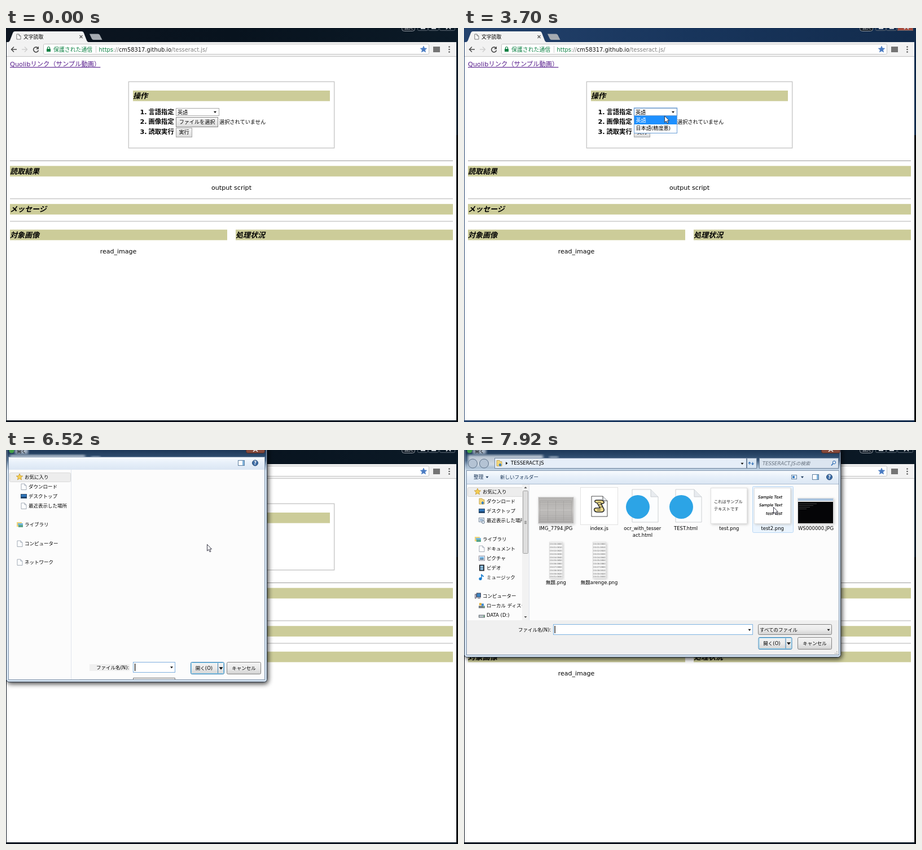
Recreate the animation shown at these times as an HTML page. Size 801 by 699 pixels, loop 7.99 s.

```html
<!DOCTYPE html>
<html lang="ja">
<meta charset="utf-8">
<title>文字読取</title>
<style>
  html, body { margin: 0; width: 100%; height: 100%; overflow: hidden; background: #fff; }
  svg { display: block; font-family: "DejaVu Sans", "Noto Sans CJK JP", sans-serif; }
</style>
<svg id="stage" width="801" height="699" viewBox="0 0 801 699"></svg>
<script>
const LOOP = 7990;

// Drawing helpers; text is placed by its vertical centre.
const rect = (x, y, w, h, fill, more = '') =>
  `<rect x="${x}" y="${y}" width="${w}" height="${h}" fill="${fill}" ${more}/>`;
const box = (x, y, w, h, fill, stroke, r = 0) =>
  rect(x + .5, y + .5, w - 1, h - 1, fill, `stroke="${stroke}" rx="${r}"`);
const text = (s, x, y, size = 8.5, more = '') =>
  `<text x="${x}" y="${y + size * .37}" font-size="${size}" ${more}>${s}</text>`;
const mid = (s, x, y, size, more = '') => text(s, x, y, size, 'text-anchor="middle" ' + more);
const path = (d, fill, stroke = 'none', width = 1) =>
  `<path d="${d}" fill="${fill}" stroke="${stroke}" stroke-width="${width}"/>`;
const circle = (x, y, r, fill, stroke = 'none') =>
  `<circle cx="${x}" cy="${y}" r="${r}" fill="${fill}" stroke="${stroke}"/>`;
const tri = (x, y, s = 2.5, fill = '#111') => path(`M${x - s} ${y - s / 2}h${2 * s}l${-s} ${s * 1.3}z`, fill);
const group = (id, ...parts) => `<g id="${id}">${parts.join('')}</g>`;
const grad = (id, across, ...stops) =>
  `<linearGradient id="${id}" x2="${across}" y2="${1 - across}">` +
  stops.map((c, i) => `<stop offset="${i / (stops.length - 1)}" stop-color="${c}"/>`).join('') +
  '</linearGradient>';
const sheet = (x, y, w, h, fold, stroke = '#8d98a5') =>
  path(`M${x} ${y}h${w - fold}l${fold} ${fold}v${h - fold}h${-w}z`, '#fcfdfe', stroke, .8) +
  path(`M${x + w - fold} ${y}v${fold}h${fold}`, '#e8ebef', stroke, .8);
const star = (x, y, r, fill, stroke) => path('M' + Array.from({ length: 10 }, (_, i) => {
  const a = i * Math.PI / 5, q = i % 2 ? r * .45 : r;
  return `${(x + q * Math.sin(a)).toFixed(2)} ${(y - q * Math.cos(a)).toFixed(2)}`;
}).join('L') + 'z', fill, stroke, .7);

const defs = '<defs>' +
  grad('dark', 1, '#0d1520', '#08131e', '#0b1a27') +
  grad('blue', 1, '#24426c', '#18355c', '#122b4c') +
  grad('button', 0, '#f7f7f7', '#dcdcdc') +
  grad('pressed', 0, '#d4d4d4', '#eeeeee') +
  grad('winButton', 0, '#f3f3f3', '#ebebeb', '#d2d2d2') +
  grad('tools', 0, '#f8fbfe', '#e6eff9', '#dbe6f3') +
  grad('header', 0, '#1d3858', '#2a4768', '#3f5d7f', '#91a9c2', '#cfdfee') +
  grad('photo', 0, '#b3b1af', '#c6c4c2', '#adabaa') +
  '<filter id="soft"><feGaussianBlur stdDeviation="2"/></filter>' +
  '<filter id="shadow" x="-10%" y="-10%" width="120%" height="120%">' +
  '<feDropShadow dx="2" dy="3" stdDeviation="4" flood-opacity=".75"/></filter></defs>';

function browser() {
  const green = 'fill="#0b8043"', white = '#c9ced4';
  const glyphs = rect(735, 0, 8, 2, white) + rect(754, 0, 8, 2, white) +
    path('M780 2l3-3M788 2l-3-3', 'none', white, 2);
  return rect(0, 0, 801, 699, 'url(#dark)') +
    group('active', rect(0, 0, 801, 699, 'url(#blue)'), rect(768, 0, 28, 5, '#a64a3c')) +
    rect(798, 190, 3, 509, '#05090f') +
    box(701, -8, 24, 14, '#18222d', '#8c949d', 4) + text('拡大', 706, -1, 7.5, `fill="${white}"`) +
    [[729, 19], [748, 19], [768, 28]].map(([x, w]) => box(x, -8, w, 13, 'none', '#5d6874', 2)).join('') + glyphs +
    rect(1, 25, 797, 671, '#fff') + rect(1, 25, 797, 25, '#f2f2f2') + rect(1, 50, 797, 1, '#c4c4c4') +
    path('M3 25.5Q6 25 7 22L12 9Q13 6 16 6H134Q137 6 138 9L143 22Q144 25 148 25.5z', '#f2f2f2') +
    path('M148 10.5H163Q165 10.5 166 12L170.500 21H155Q153 21 152 19z', '#a6abb1') +
    sheet(19, 11, 7, 9, 3, '#555') + text('文字読取', 31, 15.5, 8.8) +
    path('M130.500 13l5 5m0-5l-5 5', 'none', '#555', 1.2) +
    path('M19 38H9.500M14 33.500L9.500 38L14 42.500', 'none', '#4a4a4a', 1.5) +
    path('M28 38H37.500M33 33.500L37.500 38L33 42.500', 'none', '#cfcfcf', 1.5) +
    path('M57 36A4.500 4.500 0 1 0 57.500 39.500', 'none', '#4a4a4a', 1.6) + path('M58 32.500v5h-5z', '#4a4a4a') +
    box(66, 28, 684, 19, '#fff', '#c3c3c3', 2) +
    rect(72, 37, 7, 5, '#0b8043') + path('M73.500 37v-1.500a2 2 0 0 1 4 0V37', 'none', '#0b8043', 1.2) +
    text('保護された通信', 84, 38, 9.9, green) + rect(159, 32, 1, 12, '#ccc') +
    text('<tspan fill="#0b8043">https</tspan>://<tspan fill="#111">cm58317.github.io</tspan>/tesseract.js/',
      164.5, 38, 9.9, 'fill="#808080"') +
    star(740, 38, 6, '#4a7bc2', '#4a7bc2') + rect(757, 33, 12, 10, '#747474') +
    [33.5, 38, 42.5].map(y => circle(785.5, y, 1.3, '#555')).join('');
}

function page() {
  const heading = (s, x, y, w) => rect(x, y, w, 18.7, '#cccc99') +
    text(s, x, y + 9, 13, 'font-weight="bold" font-style="italic"');
  const line = y => rect(7, y, 785, 1, '#a3a3a3') + rect(7, y + 1, 785, .5, '#e8e8e8');
  const step = (n, s, y) => text(n + '.', 237.5, y, 11.3, 'font-weight="bold"') +
    text(s, 252.5, y, 11.3, 'font-weight="bold"');
  return text('Quolibリンク（サンプル動画）', 7, 64, 11.3, 'fill="#551a8b" text-decoration="underline"') +
    rect(217.3, 95.3, 364.4, 117.6, '#fff', 'stroke="#cacaca" stroke-width="1.5"') +
    heading('操作', 225, 111, 349) +
    step(1, '言語指定', 149) + step(2, '画像指定', 166) + step(3, '読取実行', 184) +
    box(301, 142, 77, 14, '#fff', '#a9a9a9') + group('hover', box(301, 142, 77, 14, 'none', '#7c7c7c')) +
    group('focus', rect(301.5, 142, 76, 13.5, 'none', 'stroke="#6b9fd8" stroke-width="1.4"')) +
    text('英語', 304, 149.3, 9.1) + tri(370.5, 149, 2.5) +
    box(301, 158, 75, 18, 'url(#button)', '#a4a4a4') +
    group('pressed', box(301, 158, 75, 18, 'url(#pressed)', '#8a8a8a')) +
    group('ring', box(301, 158, 75, 18, 'none', '#6b9fd8')) +
    mid('ファイルを選択', 338.5, 166.7, 9.1) + text('選択されていません', 378, 166.7, 9.2) +
    box(301, 177, 29, 17, 'url(#button)', '#a4a4a4') + mid('実行', 315.5, 185, 9.1) +
    line(235) + heading('読取結果', 7, 244.7, 785) + mid('output script', 399.5, 282.5, 11.1) +
    line(302.5) + heading('メッセージ', 7, 312.2, 785) + line(342.5) +
    heading('対象画像', 7, 357.7, 385) + heading('処理状況', 407, 357.7, 385) +
    mid('read_image', 199, 395.5, 11) +
    group('menu', box(301, 155, 77, 32, '#fff', '#6b9fd8'), rect(302, 156, 75, 15, '#1e90ff'),
      text('英語', 304.5, 163.3, 9.1, 'fill="#fff"'), text('日本語(精度悪)', 304.5, 178, 9.1)) +
    group('tip', box(356, 181, 87, 18, '#fff', '#8a8a8a', 1),
      text('選択されていません', 358.5, 190, 9, 'fill="#555"'));
}

const caretLine = (x, y) => rect(x, y, 1.2, 13, '#000', 'class="caret"');
const winButton = (s, x, y, w) => box(x, y, w, 22, 'url(#winButton)', '#838383', 2) + mid(s, x + w / 2, y + 11);
const openButton = (x, y) => box(x, y, 60, 22, 'url(#winButton)', '#3c7fb1', 2) +
  box(x + 1, y + 1, 58, 20, 'none', '#8fd3f1', 1) + rect(x + 48, y + 2, 1, 18, '#3c7fb1') +
  mid('開く(O)', x + 24, y + 11) + tri(x + 54, y + 11, 3.5);
const toolIcons = (x, y) => box(x, y - 5, 12, 10, '#fff', '#6080a0') + rect(x + 8, y - 4, 3, 8, '#7fb2dc') +
  circle(x + 30.5, y, 5, '#3e6ea8', '#24476f') + mid('?', x + 30.5, y, 8, 'fill="#fff" font-weight="bold"');

// Glass frame: the browser's dark caption and pale tab show through, blurred.
function frame(w, h, closeX) {
  return rect(.5, -10, w - 1, h + 9.5, '#cfdfee', 'stroke="#26364a" rx="5" filter="url(#shadow)"') +
    rect(1, 0, w - 2, 37, 'url(#header)') +
    rect(7, 9, 133, 20, '#eef3f8', 'opacity=".75" filter="url(#soft)"') +
    rect(151, 11, 16, 9, '#b9c6d4', 'opacity=".7" filter="url(#soft)"') +
    rect(16, -3, 23, 10, '#e6eef7', 'opacity=".7" filter="url(#soft)"') +
    rect(1.5, -8, w - 3, h + 6.5, 'none', 'stroke="#f2f8fd" stroke-opacity=".55" rx="4"') +
    circle(10, 1, 4.5, '#43a047') + text('開く', 19, 2) +
    box(closeX, -8, 34, 14, '#85493b', '#4b2a25', 3) +
    path(`M${closeX + 13} 3l4-4l4 4`, 'none', '#eee', 1.6);
}

// Navigation icons, drawn around their centre.
const icons = {
  star: (x, y) => star(x, y, 6, '#f6cf52', '#b98a1d'),
  doc: (x, y) => sheet(x - 4, y - 5, 9, 10.5, 3),
  desk: (x, y) => box(x - 5, y - 4, 11, 8, '#2f74b8', '#33506e') + rect(x - 4, y + 1, 9, 2, '#1b3f69'),
  folder: (x, y) => path(`M${x - 4} ${y - 5}h5l1 2h3v8h-9z`, '#f4d87c', '#b99a44', .8) +
    path(`M${x + 2} ${y}v4m-2-2l2 2.500l2-2.500`, 'none', '#2878c8', 1.6),
  library: (x, y) => rect(x - 5, y - 4, 9, 8, '#f1d57a') + rect(x - 3, y - 2, 9, 3, '#76b8dd') + rect(x - 2, y + 1, 8, 4, '#58a48d'),
  recent: (x, y) => box(x - 5, y - 5, 10, 8, '#f5f8fb', '#7c8ca0') + rect(x - 3, y - 3, 6, 4, '#9fb9d4') + circle(x + 3, y + 3, 2.5, '#dfe8f1', '#708090'),
  picture: (x, y) => box(x - 5, y - 4, 11, 9, '#fff', '#889') + rect(x - 3, y - 2, 7, 3, '#71b6e8') + rect(x - 3, y + 1, 7, 2, '#3f6c8e'),
  video: (x, y) => box(x - 4, y - 5, 9, 11, '#33475c', '#222') + rect(x - 2, y - 3, 5, 3, '#9bd0f2') + rect(x - 2, y + 1, 5, 3, '#9bd0f2'),
  music: (x, y) => path(`M${x} ${y + 3}v-8q1 3 4 4`, 'none', '#1c7fd0', 1.6) + circle(x - 2, y + 3, 2.6, '#1c7fd0'),
  computer: (x, y) => box(x - 2, y - 5, 8, 8, '#3e83c0', '#445') + rect(x, y + 4, 5, 1, '#556') + box(x - 5, y - 3, 3, 8, '#dde', '#778'),
  disk: (x, y) => rect(x - 5, y + 1, 11, 4, '#6c7780') + rect(x - 4, y - 4, 4, 4, '#e4b13a') + rect(x, y - 3, 4, 4, '#3b8ad4') + rect(x + 3, y + 2, 2, 1, '#7f7'),
  drive: (x, y) => box(x - 5, y, 11, 5, '#c5ccd2', '#5c666e') + rect(x + 3, y + 2, 2, 1, '#3b3'),
};
const nav = rows => rows.map(([name, icon, y, sub]) =>
  icons[icon](sub ? 31 : 24, y) + text(name, sub ? 40 : 33, y)).join('');
const chosen = y => box(6, y - 8, 109, 17, '#ededed', '#dadada', 2);

function smallDialog() {
  return frame(463, 412, 425) + rect(4, 12, 454, 23, 'url(#tools)') + toolIcons(411, 23) +
    box(4, 12, 455, 396, 'none', '#8296ad') +
    rect(5, 35, 453, 372, '#fcfcfc') + rect(115, 35, 1, 372, '#dfe5ec') + chosen(48) +
    nav([['お気に入り', 'star', 48], ['ダウンロード', 'doc', 65, 1], ['デスクトップ', 'desk', 82, 1],
      ['最近表示した場所', 'doc', 99, 1], ['ライブラリ', 'library', 132], ['コンピューター', 'doc', 166],
      ['ネットワーク', 'doc', 199]]) +
    rect(148, 380, 71, 12, '#f0f0f0') + text('ファイル名(N):', 160, 386) +
    box(225, 376, 75, 19, '#fff', '#7eaede') + caretLine(228, 379) + tri(293.5, 385.5) +
    openButton(327, 376) + winButton('キャンセル', 391, 376, 61) +
    path('M225.500 407v-2.500h74v2.500', '#eee', '#777') + rect(130, 406, 90, 1, '#eee');
}

function largeDialog() {
  const blueText = 'fill="#1e395b"';
  return frame(668, 368, 633) +
    circle(15.5, 24, 8, '#b4c3d4', '#5d7188') + circle(35.5, 24, 8, '#b4c3d4', '#5d7188') +
    box(54, 14, 447, 19, '#e6eef8', '#71859e') + icons.folder(62, 23.5) +
    path('M74 21l3.500 2.500l-3.500 2.500z', '#111') + text('TESSERACT.JS', 83, 23) + tri(493, 24) +
    box(501, 14, 18, 19, '#dae6f3', '#71859e') +
    path('M506 26v-4m-2 2l2-2.500l2 2.500M511.500 21.500v4m-2-2l2 2.500l2-2.500', 'none', '#2f6db5', 1.1) +
    box(523, 14, 141, 19, '#dbe5f0', '#71859e') +
    text('TESSERACT.JSの検索', 529, 23.5, 8.5, 'fill="#66717e" font-style="italic"') +
    circle(656, 22, 2.7, 'none', '#2f6db5') + path('M654 24l-3 3.500', 'none', '#2f6db5', 1.6) +
    box(4, 36, 661, 328, '#fff', '#8296ad') +
    rect(5, 37, 659, 23, 'url(#tools)') + rect(5, 60, 659, 1, '#a9bbd0') +
    text('整理', 17, 48, 8.8, blueText) + tri(41, 48, 2.5, '#1e395b') + text('新しいフォルダー', 64, 48, 8.5, blueText) +
    box(580, 44, 10, 8, '#fff', '#6080a0') + rect(582, 46, 4, 4, '#3b7fc2') + tri(599.5, 48, 2.5, '#1e395b') +
    toolIcons(617, 48) +
    rect(5, 61, 659, 241, '#fcfcfc') + chosen(74) +
    nav([['お気に入り', 'star', 74], ['ダウンロード', 'folder', 91, 1], ['デスクトップ', 'desk', 108, 1],
      ['最近表示した場所', 'recent', 125, 1], ['ライブラリ', 'library', 158], ['ドキュメント', 'doc', 175, 1],
      ['ピクチャ', 'picture', 191.5, 1], ['ビデオ', 'video', 208.5, 1], ['ミュージック', 'music', 225.5, 1],
      ['コンピューター', 'computer', 258.5], ['ローカル ディスク', 'disk', 275.5, 1], ['DATA (D:)', 'drive', 292.5, 1]]) +
    rect(103, 61, 12, 241, '#f2f2f2') + rect(115, 61, 549, 241, '#fcfcfc') + rect(115, 61, 1, 241, '#dfe5ec') +
    box(104, 72, 10, 112, '#dedede', '#a0a0a0', 1) +
    [126, 128, 130].map(y => rect(107, y, 4, 1, '#777')).join('') +
    path('M106.500 68l2.500-3l2.500 3zM106.500 295l2.500 3l2.500-3z', '#555') +
    rect(5, 302, 659, 61, '#f0f0f0') + text('ファイル名(N):', 96, 318.5) +
    box(158, 309, 354, 19, '#fff', '#7eb4e2') + caretLine(160.5, 312) + tri(506, 319) +
    box(521, 309, 131, 19, 'url(#winButton)', '#838383', 2) + text('すべてのファイル', 524, 318.5) + tri(646, 319) +
    openButton(521.5, 332) + winButton('キャンセル', 591, 332, 61) +
    [0, 3].map(d => rect(660, 357 + d, 1.5, 1.5, '#aaa') + rect(657 + d, 360, 1.5, 1.5, '#aaa')).join('');
}

function files() {
  const names = ['IMG_7794.JPG', 'index.js', 'ocr_with_tesser', 'TEST.html', 'test.png', 'test2.png', 'WS000000.JPG'];
  const lines = (n, draw) => Array.from({ length: n }, (_, i) => draw(i)).join('');
  const thumb = (x, y, w, h, fill) => rect(x + 1.5, y + 1.5, w, h, '#bbb', 'filter="url(#soft)" opacity=".7"') +
    box(x, y, w, h, fill, '#e0e0e0');
  const web = x => sheet(x, 70, 46, 58, 13, '#c0c4c8') + circle(x + 10, 101, 21, '#2ca4e6');
  const table = x => thumb(x, 163, 24, 65, '#f6f6f6') +
    lines(11, i => mid(`03-0${i % 9}-08${i % 7}0`, x + 12, 167 + i * 5.8, 3.7, 'fill="#555"'));
  const comic = 'fill="#111" stroke="#111" stroke-width=".2" font-style="oblique"';
  const serif = 'font-family="Noto Serif, Noto Sans CJK JP, serif" fill="#222"';
  return group('pick', box(511, 64, 73, 83, '#eaf4fe', '#bad8f5', 2)) +
    thumb(131, 83, 64, 48, 'url(#photo)') +
    lines(11, i => rect(134, 90 + i * 3.6, 57, .5, '#918f8c')) +
    lines(5, i => rect(134 + i * 14, 90, .5, 36, '#9b9996')) +
    box(206, 66, 67, 67, '#fff', '#e2e2e2') + sheet(226, 82, 28, 36, 8, '#222') +
    path('M235 89q-4 0-3 3q1 2 4 2l5 9h-8q-3 1-2 4t5 3h9q4-1 3-5l-5-10h3q3-1 2-3t-4-3z', '#ecd98a', '#222', 1.5) +
    path('M237 93h6M239 97h5M241 101h5M236 106.500h6', 'none', '#222', .9) +
    web(298) + web(375) +
    thumb(437, 67, 65, 64, '#fff') + text('これはサンプル', 443, 91.5, 7.3, serif) + text('テキストです', 443, 104.5, 7.3, serif) +
    thumb(514, 67, 65, 64, '#fff') + text('Sample Text', 521, 83, 7, comic) + text('Sample Text', 523, 98, 6.7, comic) +
    text('test test', 535, 112.5, 7, comic) +
    thumb(591, 85, 64, 46, '#050507') + rect(592, 86, 62, 4, '#a9c3de') + rect(592, 90, 62, 2, '#e6e6e6') +
    lines(4, i => rect(593, 95 + i * 3, 32 - i * 6, .7, '#555')) +
    table(151) + table(228) +
    names.map((s, i) => mid(s, 162.7 + i * 76.8, 139, 8.5)).join('') +
    mid('act.html', 316.5, 151, 8.5) + mid('無題.png', 163, 235, 8.5) + mid('無題arenge.png', 239.5, 235, 8.5);
}

const stage = document.getElementById('stage');
stage.innerHTML = defs + browser() + page() +
  group('small', smallDialog()) + group('large', largeDialog()) + group('files', files()) +
  group('cursor', path('M.5 .5V12L3.200 9.500L5.200 13.800L7 13L5.100 8.800H8.500z', '#fff', '#223', .9));

// Pointer track: time, x, y
const track = [
  [340, 768, 502], [560, 480, 240], [740, 338, 102], [820, 330, 90], [900, 335, 99], [960, 335, 99],
  [1130, 346, 134], [1430, 370, 148], [3470, 370, 148], [3780, 350, 158], [3900, 350, 158],
  [4080, 348, 162], [5050, 348, 162], [5120, 351, 163], [5340, 356, 167], [7450, 356, 167], [7840, 548, 101],
];
const ramp = (t, a, b) => Math.min(1, Math.max(0, (t - a) / (b - a)));
const alpha = (id, v) => document.getElementById(id).setAttribute('opacity', v);
const show = (id, on) => { document.getElementById(id).style.display = on ? '' : 'none'; };

function draw(t) {
  const within = (a, b = LOOP) => t >= a && t < b;
  alpha('active', t < 6280 ? ramp(t, 1780, 2150) : 0);
  alpha('menu', ramp(t, 1780, 2000));
  alpha('pick', ramp(t, 7700, 7920));
  show('menu', within(1840, 4510));
  show('hover', within(1280, 1840));
  show('focus', within(1840, 5970));
  show('tip', within(5660, 5970));
  show('pressed', within(5970, 6130));
  show('ring', within(5970));
  show('small', within(6520, 6610));
  show('large', within(6610));
  show('files', within(6680));
  const lit = !within(6920, 7450) && t < 7980;
  for (const c of document.querySelectorAll('.caret')) c.style.display = lit ? '' : 'none';

  show('cursor', t >= 340);
  const next = track.findIndex(p => p[0] > t);
  const b = track[next < 0 ? track.length - 1 : next], a = next > 0 ? track[next - 1] : b;
  const k = a === b ? 0 : ramp(t, a[0], b[0]);
  const at = i => (a[i] + (b[i] - a[i]) * k).toFixed(1);
  document.getElementById('cursor').setAttribute('transform', `translate(${at(1)} ${at(2)})`);
}

const start = performance.now();
function tick() {
  draw((performance.now() - start) % LOOP);
  requestAnimationFrame(tick);
}
tick();
</script>
</html>
```
